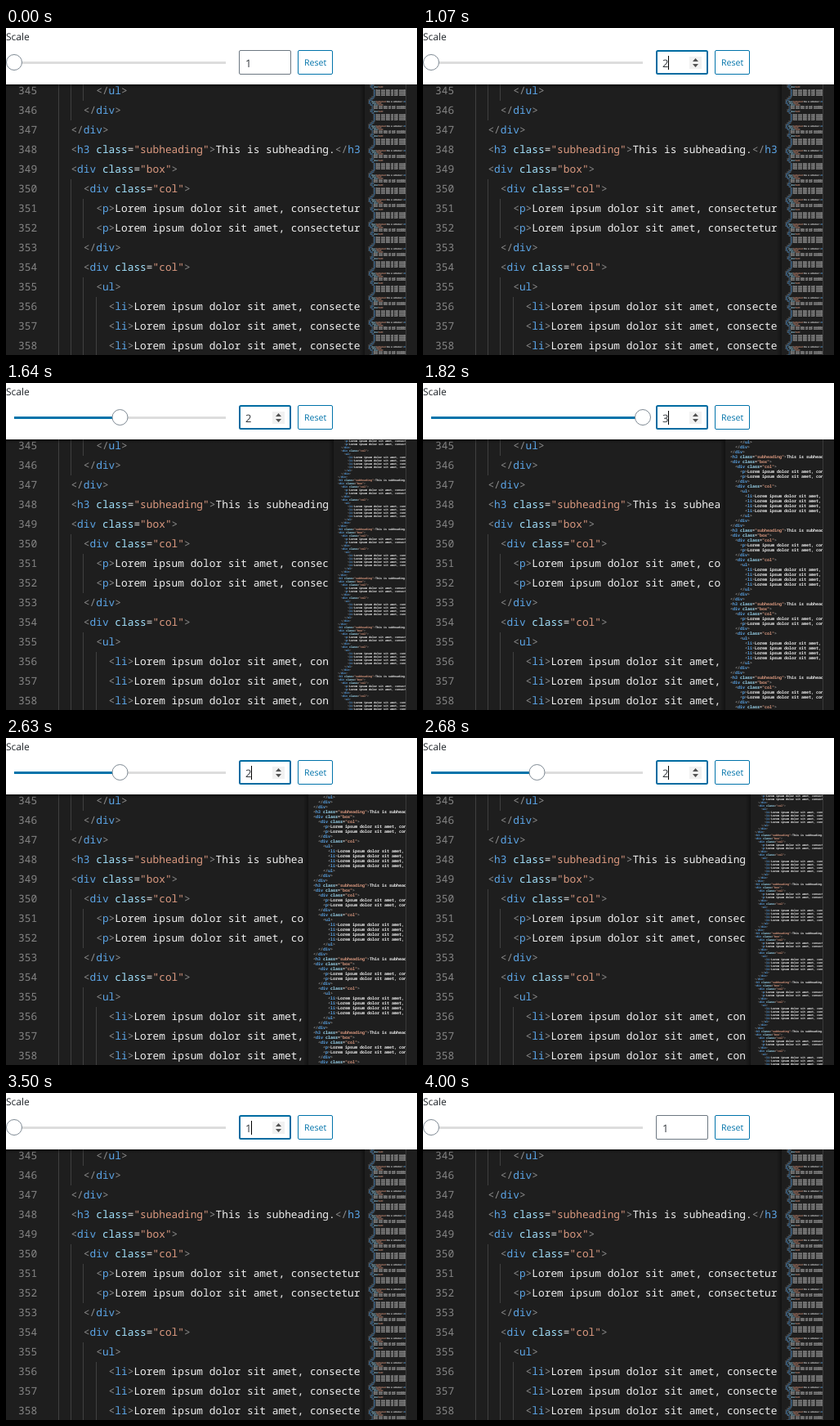
An HTML page with a canvas for the animation above (4130 ms loop, 503x400 px).

```html
<!DOCTYPE html>
<html lang="en">
<head>
<meta charset="utf-8">
<title>Minimap scale</title>
<style>
html, body { margin: 0; width: 100%; height: 100%; overflow: hidden; background: #fff; }
canvas { display: block; }
</style>
</head>
<body>
<canvas id="stage" width="503" height="400"></canvas>
<script>
const ctx = document.getElementById('stage').getContext('2d');
ctx.textRendering = 'geometricPrecision';

const LOOP = 4130, TOP = 69, RIGHT = 489, CHAR = 7.7;
const MONO = '"Noto Sans Mono", "DejaVu Sans Mono", monospace';
const SANS = '"Open Sans", "Noto Sans", sans-serif';
const BLUE = '#0073aa';

// Each step changes part of the state from its time on.
const steps = [
  [0, { value: 1, knob: 1, scale: 1, focus: false, caret: false, spin: false }],
  [510, { spin: true }],
  [760, { focus: true, caret: true }],
  [1070, { value: 2 }],
  [1140, { knob: 2, scale: 2 }],
  [1640, { caret: false }],
  [1820, { value: 3, knob: 3, scale: 3, caret: true }],
  [2370, { caret: false }],
  [2630, { value: 2, knob: 2, caret: true }],
  [2680, { scale: 2 }],
  [3180, { caret: false }],
  [3430, { value: 1, knob: 1, caret: true }],
  [3500, { scale: 1 }],
  [4000, { focus: false, caret: false, spin: false }],
];

// Per scale: right edge of the code, left edge and first line of the minimap
const layouts = [
  { edge: 433, left: 441, first: 293 },
  { edge: 395, left: 402, first: 321 },
  { edge: 364, left: 370, first: 330 },
];

const lorem = 'Lorem ipsum dolor sit amet, consectetur adipiscing elit.';
const para = `      <p>${lorem}</p>`;
const item = `        <li>${lorem}</li>`;
const block = [
  '      </ul>', '    </div>', '  </div>',
  '  <h3 class="subheading">This is subheading.</h3>',
  '  <div class="box">', '    <div class="col">', para, para, '    </div>',
  '    <div class="col">', '      <ul>', item, item, item, item,
];
const lineAt = n => block[n % block.length];

// Colours for: bracket, tag, attribute, equals sign, string, bracket, text
const palette = ['#8c8c8c', '#5ca6e8', '#a4e4ff', '#dedede', '#dc9a80', '#8c8c8c', '#f0f0f0'];

function tokens(line) {
  const out = [];
  for (const m of line.matchAll(/(<\/?)(\w+)(?:( \w+)(=)("[^"]*"))?(>)|([^<]+)/g)) {
    let col = m.index;
    m.slice(1).forEach((text, i) => {
      if (!text) return;
      out.push({ col, text, color: palette[i] });
      col += text.length;
    });
  }
  return out;
}

function write(text, x, y, font, color) {
  ctx.font = font;
  ctx.fillStyle = color;
  ctx.fillText(text, x, y);
}

function rect(x, y, w, h, color) {
  ctx.fillStyle = color;
  ctx.fillRect(x, y, w, h);
}

function clipped(x, y, w, h, paint) {
  ctx.save();
  ctx.beginPath();
  ctx.rect(x, y, w, h);
  ctx.clip();
  paint();
  ctx.restore();
}

function frame(x, y, w, h, line, color) {
  ctx.beginPath();
  ctx.roundRect(x + line / 2, y + line / 2, w - line, h - line, 1.5);
  ctx.lineWidth = line;
  ctx.strokeStyle = color;
  ctx.stroke();
}

function arrow(y, dir) {
  ctx.beginPath();
  ctx.moveTo(330, y);
  ctx.lineTo(337, y);
  ctx.lineTo(333.5, y + 4 * dir);
  ctx.fillStyle = '#505050';
  ctx.fill();
}

function drawControls(s) {
  rect(0, 0, 503, TOP, '#fff');
  write('Scale', 0, 15, `12px ${SANS}`, '#23282d');

  const x = 10 + (s.knob - 1) * 129.5;
  rect(10, 41, 259, 3, '#ddd');
  rect(10, 41, x - 10, 3, BLUE);
  ctx.beginPath();
  ctx.arc(x, 42, 9.5, 0, 7);
  ctx.fillStyle = '#fff';
  ctx.fill();
  ctx.lineWidth = 1;
  ctx.strokeStyle = '#7e8993';
  ctx.stroke();

  frame(285, 27, 64, 30, s.focus ? 2 : 1, s.focus ? '#006ba1' : '#6c7781');
  write(s.value, 293, 48, `13px ${SANS}`, '#32373c');
  if (s.caret) rect(300, 34, 1, 17, '#000');
  if (s.spin) {
    rect(326, 35, 15, 15, '#f1f1f1');
    arrow(41, -1);
    arrow(44, 1);
  }
  frame(357, 27, 43, 30, 1, BLUE);
  write('Reset', 365, 46, `10.6px ${SANS}`, BLUE);
}

function drawCode(edge) {
  const font = `500 ${CHAR / 0.6}px ${MONO}`;
  clipped(0, TOP, edge, 331, () => {
    for (let n = 345; n < 360; n++) {
      const y = 65 + (n - 345) * 24, line = lineAt(n);
      write(n, 15, y + 16, font, '#858585');
      for (let col = 0; col < line.search(/\S/); col += 2) {
        rect(64 + Math.floor(col * CHAR), y, 1, 24, '#404040');
      }
      for (const t of tokens(line)) write(t.text, 64 + t.col * CHAR, y + 16, font, t.color);
    }
  });
}

// At the smallest scale every letter is only two pixels, one above the other.
function drawDots(t, x, y) {
  [...t.text].forEach((c, i) => {
    if (c === ' ') return;
    const tall = /[A-Zbdfhklt0-9"]/.test(c);
    ctx.globalAlpha = tall ? 0.4 : 0.25;
    rect(x + i, y, 1, 1, t.color);
    ctx.globalAlpha = /[.,<>=]/.test(c) ? 0.2 : 0.45;
    rect(x + i, y + 1, 1, 1, t.color);
  });
  ctx.globalAlpha = 1;
}

function drawMinimap(scale, { left, first }) {
  const rowHeight = scale * 2;
  const font = `bold ${scale / 0.6}px ${MONO}`;
  clipped(left, TOP, RIGHT - left, 331, () => {
    for (let row = 0; row * rowHeight < 331; row++) {
      const y = TOP + row * rowHeight;
      for (const t of tokens(lineAt(first + row))) {
        const x = left + t.col * scale;
        if (scale === 1) drawDots(t, x, y);
        else write(t.text, x, y + scale * 1.5, font, t.color);
      }
    }
  });
}

function shade(x, y, w, h, x1, y1, x2, y2) {
  const g = ctx.createLinearGradient(x1, y1, x2, y2);
  g.addColorStop(0, 'rgba(0,0,0,0)');
  g.addColorStop(1, 'rgba(0,0,0,.4)');
  rect(x, y, w, h, g);
}

function draw(now) {
  const time = now % LOOP;
  const s = Object.assign({}, ...steps.filter(([t]) => t <= time).map(([, change]) => change));
  const layout = layouts[s.scale - 1], { edge } = layout;
  rect(0, TOP, 503, 331, '#1e1e1e');
  drawCode(edge);
  drawMinimap(s.scale, layout);
  shade(edge, TOP, 6, 331, edge, 0, edge + 6, 0);
  shade(0, TOP, edge + 6, 5, 0, TOP + 5, 0, TOP);
  rect(RIGHT, TOP, 1, 331, '#3a3a3a');
  drawControls(s);
  requestAnimationFrame(draw);
}
requestAnimationFrame(draw);
</script>
</body>
</html>
```
